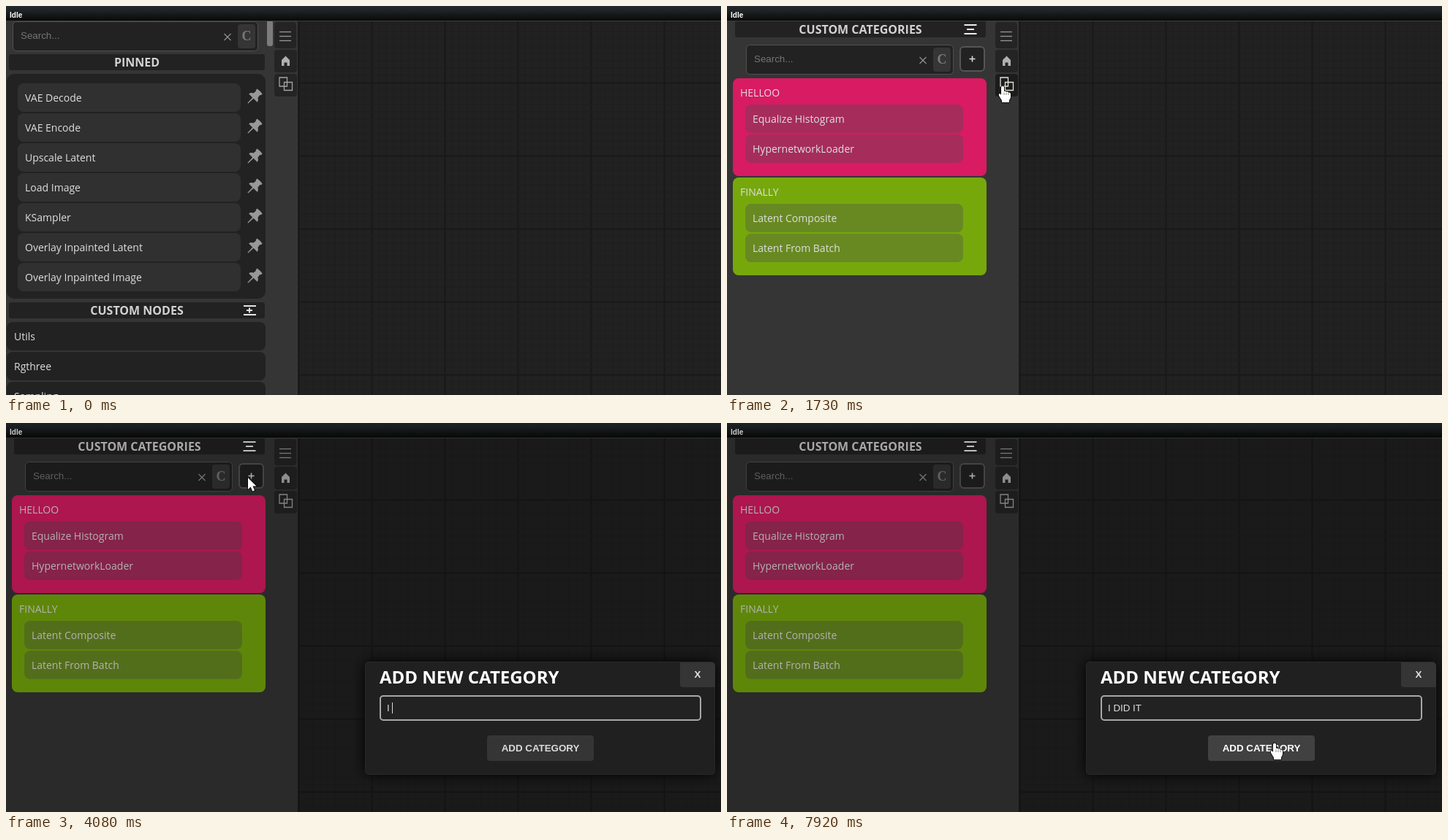
Recreate the animation shown at these times as an HTML page with a canvas. Size 978 by 533 pixels, loop 8 s.

```html
<!DOCTYPE html>
<html lang="en">
<head>
<meta charset="utf-8">
<title>Custom categories</title>
<style>
html, body { margin: 0; width: 100%; height: 100%; overflow: hidden; background: #212121; }
canvas { display: block; }
</style>
</head>
<body>
<canvas id="stage" width="978" height="533"></canvas>
<script>
const W = 978, H = 533, LOOP = 8000;
const ctx = document.getElementById('stage').getContext('2d');

const UI = '14px "Open Sans", sans-serif';
const HEAD = 'bold 16px "Open Sans", sans-serif';
const FIELD = '13.333px "Liberation Sans", Arial, sans-serif';
const BUTTON = 'bold ' + FIELD;

const TAB = [367, 93, 31, 31], PLUS = [318, 55, 35, 35], ADD = [658, 428, 146, 35];
const HAND = new Path2D('M-2 2Q0-1 2 2L2 8Q4 6.5 5 8.7Q7.5 7.5 8 9.7Q11 9 11 12L11 16Q10.5 18 9 20L9 23L-1 23L-1 20.5L-5 14Q-6 11-3.5 11L-2 13Z');
const ARROW = new Path2D('M0 0L0 16L3.7 12.6L6.2 18.5L9 17.3L6.5 11.5L11.5 11.5Z');

// Time at which each state of the typed text begins
const TYPED = [[3860, 'I'], [4080, 'I '], [4240, 'I D'], [4390, 'I DI'], [4550, 'I DID'],
  [4940, 'I DID '], [5090, 'I DID I'], [5250, 'I DID IT']];
const CARET_FLIPS = [3260, 3790, 5800, 6350, 6820, 7360, 7920];

function box([x, y, w, h], r, fill, stroke, lw = 1) {
  ctx.beginPath();
  ctx.roundRect(x, y, w, h, r);
  if (fill) { ctx.fillStyle = fill; ctx.fill(); }
  if (stroke) { ctx.strokeStyle = stroke; ctx.lineWidth = lw; ctx.stroke(); }
}

function text(s, x, y, font = UI, color = '#dedede', align = 'left') {
  ctx.font = font;
  ctx.fillStyle = color;
  ctx.textAlign = align;
  ctx.fillText(s, x, y);
}

function line(x1, y1, x2, y2, color, lw) {
  ctx.strokeStyle = color;
  ctx.lineWidth = lw;
  ctx.beginPath();
  ctx.moveTo(x1, y1);
  ctx.lineTo(x2, y2);
  ctx.stroke();
}

const inside = (p, [x, y, w, h]) => p && p.x >= x && p.x <= x + w && p.y >= y && p.y <= y + h;
const lerp = (a, b, p) => a + (b - a) * p;
const stepIndex = (t, from, to, n) =>
  Math.max(0, Math.min(n - 1, Math.floor((t - from) / (to - from) * (n - 1) + 1e-6)));

function pointer(t) {
  if (t < 530) return null;
  if (t < 1390) {
    const p = 1 - (1 - stepIndex(t, 530, 1060, 9) / 8) ** 2;
    return { x: lerp(959, 374, p), y: lerp(362, 109, p) };
  }
  if (t < 1990) return { x: 377, y: 109 };
  if (t < 7120) {
    const p = (stepIndex(t, 1990, 2520, 9) + 1) / 9, q = 1 - p;
    return { x: q * q * 377 + 2 * p * q * 178 + p * p * 331, y: q * q * 109 + 2 * p * q * 88 + p * p * 75 };
  }
  const p = (stepIndex(t, 7120, 7600, 7) + 1) / 7, e = p * p * (3 - 2 * p);
  return { x: lerp(331, 749, e), y: lerp(75, 438, e) };
}

function workspace() {
  ctx.fillStyle = '#212121';
  ctx.fillRect(0, 0, W, H);
  for (let x = 400; x < W; x += 10) {
    ctx.fillStyle = x % 100 ? '#1e1e1e' : '#191919';
    ctx.fillRect(x - 0.5, 20, x % 100 ? 1 : 2, H);
  }
  for (let y = 25; y < H; y += 10) {
    const major = y % 100 === 5;
    ctx.fillStyle = major ? '#191919' : '#1e1e1e';
    ctx.fillRect(400, y - 0.5, W, major ? 2 : 1);
  }
  ctx.fillStyle = '#353535';
  ctx.fillRect(0, 20, 399, H);
}

function titleBar() {
  const g = ctx.createLinearGradient(0, 0, 0, 20);
  g.addColorStop(0, '#242a2d');
  g.addColorStop(0.3, '#1f2426');
  g.addColorStop(1, '#090909');
  ctx.fillStyle = g;
  ctx.fillRect(0, 0, W, 20);
  ctx.fillStyle = '#3c3c3c';
  ctx.fillRect(0, 20, W, 1);
  text('Idle', 5, 16, 'bold 10px "Liberation Sans", Arial, sans-serif', '#fff');
}

function tabs(hover) {
  box([367, 22, 30, 36], 4, '#242424');
  box([367, 60, 31, 31], 4, '#242424');
  box(TAB, 4, hover ? '#1c1c1c' : '#242424');
  for (const y of [35.5, 41.5, 47.5]) line(374, y, 390, y, '#969696', 1.3);
  ctx.fillStyle = '#b0b0b0';
  ctx.fill(new Path2D('M382.5 68.5L388 74V82H384.5V77.5H380.5V82H377V74Z'));
  const ink = hover ? '#e2e2da' : '#a4a4a4';
  box([374, 98, 10.5, 12], 0, null, ink, 1.3);
  box([380.5, 104.5, 11, 11], 0, null, ink, 1.3);
}

function search(x, y, w) {
  box([x + 0.5, y + 0.5, w - 1, 40], 5, '#222', '#505050');
  text('Search...', x + 11, y + 24, FIELD, '#757575');
  const cx = x + w - 42, cy = y + 21.5;
  line(cx - 4.5, cy - 4.5, cx + 4.5, cy + 4.5, '#909090', 1.3);
  line(cx + 4.5, cy - 4.5, cx - 4.5, cy + 4.5, '#909090', 1.3);
  box([x + w - 28, y + 4, 24, 33], 4, '#353535');
  text('C', x + w - 16, y + 26, 'bold 18px "Liberation Serif", serif', '#797979', 'center');
}

function pin(x, y) {
  ctx.save();
  ctx.translate(x, y);
  ctx.rotate(Math.PI / 4);
  ctx.fillStyle = '#989898';
  ctx.fill(new Path2D('M-5-10Q0-11 5-10L5-7.5L3.8-6.5L4.3-2Q8 0 8 3L1 3L0.6 13L-0.6 13L-1 3L-8 3Q-8 0-4.3-2L-3.8-6.5L-5-7.5Z'));
  ctx.restore();
}

function nodeList() {
  search(9, 21, 336);
  box([357, 18, 8, 37], 3, '#7c7c7c');
  box([4, 66, 350, 22], 3, '#222');
  text('PINNED', 179, 82.5, HEAD, '#d2d2d2', 'center');
  box([1, 93, 354, 308], 10, '#222');
  ['VAE Decode', 'VAE Encode', 'Upscale Latent', 'Load Image', 'KSampler',
    'Overlay Inpainted Latent', 'Overlay Inpainted Image'].forEach((name, i) => {
    const y = 106 + i * 41;
    box([16, y, 305, 39], 8, '#303030');
    text(name, 26, y + 25);
    pin(340, y + 18);
  });
  box([4, 406, 350, 22], 3, '#222');
  text('CUSTOM NODES', 179, 422.5, HEAD, '#d2d2d2', 'center');
  for (const y of [411, 423]) line(325, y, 342, y, '#e4e4e4', 2);
  line(329, 417, 337, 417, '#e4e4e4', 2);
  line(333, 413.5, 333, 420.5, '#e4e4e4', 2);
  ['Utils', 'Rgthree', 'Sampling'].forEach((name, i) => {
    box([1, 433 + i * 41, 354, 39], 8, '#222');
    text(name, 11, 458 + i * 41);
  });
}

function category(y, title, names, color, itemColor) {
  box([8, y, 347, 134], 8, color);
  text(title, 18, y + 25);
  names.forEach((name, i) => {
    box([25, y + 36 + i * 41, 298, 39], 8, itemColor);
    text(name, 35, y + 61 + i * 41);
  });
}

function categories(hover) {
  box([11, 20, 343, 23], 3, '#222');
  text('CUSTOM CATEGORIES', 182.5, 37.5, HEAD, '#d2d2d2', 'center');
  [[26, 8.5], [32, 5], [38, 8.5]].forEach(([y, r]) => line(333 - r, y, 333 + r, y, '#ececec', 2));
  search(26, 53, 284);
  box([319, 56, 33, 33], 5, '#222', hover ? '#b0b0b0' : '#555', 2);
  line(331.5, 72.5, 339.5, 72.5, '#d8d8d8', 1.6);
  line(335.5, 68.5, 335.5, 76.5, '#d8d8d8', 1.6);
  category(99, 'HELLOO', ['Equalize Histogram', 'HypernetworkLoader'], '#d81b62', '#a62c5c');
  category(235, 'FINALLY', ['Latent Composite', 'Latent From Batch'], '#76a80c', '#688922');
}

function dialog(t, hover) {
  ctx.fillStyle = 'rgba(0,0,0,.2)';
  ctx.fillRect(0, 0, W, H);
  ctx.save();
  ctx.shadowColor = '#000';
  ctx.shadowBlur = 20;
  box([491, 327, 479, 155], 5, '#202020');
  ctx.restore();
  box([491.5, 327.5, 478, 154], 5, null, '#292929');
  text('ADD NEW CATEGORY', 511, 357, 'bold 24px "Open Sans", sans-serif', '#fff');
  box([922, 328, 48, 34], [0, 5, 0, 4], '#353535');
  text('X', 946, 349, BUTTON, '#e2e2e2', 'center');

  box([512, 374, 438, 33], 4, '#222', '#a8a8a8', 2);
  const entry = TYPED.filter(([at]) => t >= at).pop();
  const value = entry ? entry[1] : '';
  if (value) text(value, 521, 395, FIELD, '#ddd');
  else text('Category Name', 521, 395, FIELD, '#757575');
  if (CARET_FLIPS.filter(at => t >= at).length % 2 === 0) {
    ctx.font = FIELD;
    ctx.fillStyle = '#ddd';
    ctx.fillRect(Math.floor(521 + ctx.measureText(value).width), 383, 1, 15);
  }

  box(ADD, 4, hover ? '#414141' : '#353535');
  text('ADD CATEGORY', 731, 450, BUTTON, hover ? '#fff' : '#dadada', 'center');
}

function drawPointer(p, hand) {
  ctx.save();
  ctx.translate(Math.round(p.x), Math.round(p.y));
  const shape = hand ? HAND : ARROW;
  ctx.strokeStyle = '#000';
  ctx.lineWidth = 1.6;
  ctx.lineJoin = 'round';
  ctx.stroke(shape);
  ctx.fillStyle = '#fff';
  ctx.fill(shape);
  if (hand) for (const x of [2, 5, 8]) line(x, 9.5, x, 13, '#555', 0.7);
  ctx.restore();
}

function render(t) {
  const p = pointer(t), open = t >= 2720, swapped = t >= 1730;
  const onTab = !open && inside(p, TAB);
  const onPlus = !open && swapped && inside(p, PLUS);
  const onAdd = open && inside(p, ADD);

  workspace();
  swapped ? categories(onPlus) : nodeList();
  tabs(onTab);
  titleBar();
  if (open) dialog(t, onAdd);

  if ((t >= 1590 && t < 1730) || (t >= 2660 && t < 2720)) {
    ctx.fillStyle = 'rgba(255,244,0,.53)';
    ctx.beginPath();
    ctx.arc(p.x, p.y, 12, 0, 7);
    ctx.fill();
  }
  if (p) drawPointer(p, onTab || onPlus || onAdd);
}

function tick() {
  render(performance.now() % LOOP);
  requestAnimationFrame(tick);
}
tick();
</script>
</body>
</html>
```
